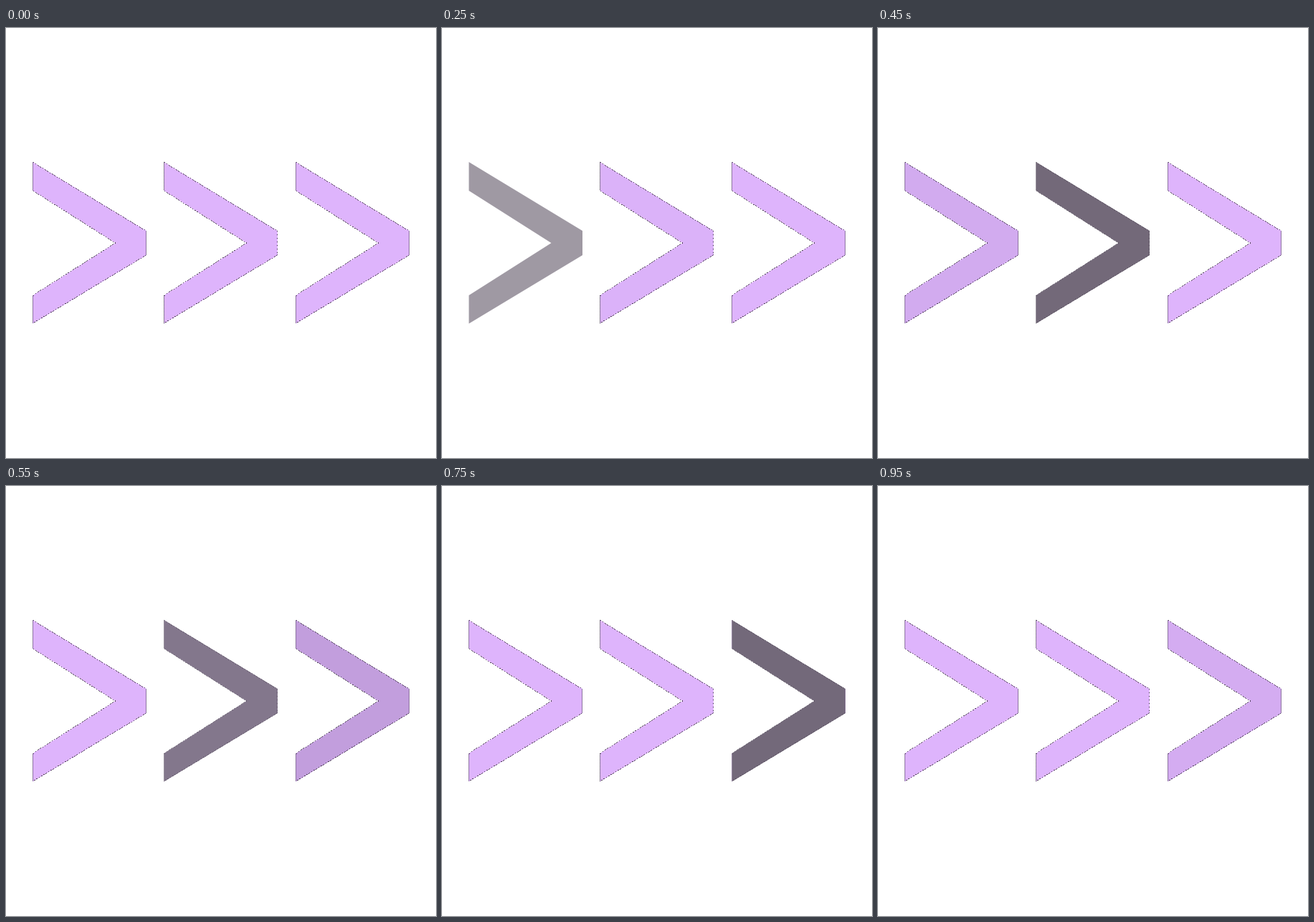
An HTML page for the animation above (1000 ms loop, 600 by 600 pixels).

```html
<!DOCTYPE html>
<html lang="en">
<head>
<meta charset="utf-8">
<title>Chevrons</title>
<style>
  html, body { margin: 0; width: 100%; height: 100%; overflow: hidden; background: #fff; }
  svg { display: block; width: 100vw; height: 100vh; }
  .edge { fill: none; stroke: #2a2230; stroke-width: .8; shape-rendering: crispEdges; }
  .slope { stroke-dasharray: 1.93 1.93; }
  .side { stroke: #8d74a0; stroke-width: 1; }
  .dots .side { stroke: #2a2230; stroke-dasharray: 1 1; }
  .dots .tip { stroke-dasharray: 1 4; }
</style>
</head>
<body>
<svg viewBox="0 0 600 600">
  <defs>
    <path id="body" d="M37.5 187L196 283V317L37.5 412.5V373L152.5 300L37.5 227Z"/>
    <path id="slopes" d="M37.5 187.5L196 283.5M196 316.5L37.5 412M37.5 373L152.5 300L37.5 227"/>
    <path id="back" d="M37.5 187V227M37.5 373V412"/>
    <path id="nose" d="M195.5 283V317"/>
  </defs>
  <g class="chevron">
    <use href="#body"/><use class="edge slope" href="#slopes"/>
    <use class="edge side" href="#back"/><use class="edge side tip" href="#nose"/>
  </g>
  <g class="chevron dots" transform="translate(183 0)">
    <use href="#body"/><use class="edge slope" href="#slopes"/>
    <use class="edge side" href="#back"/><use class="edge side tip" href="#nose"/>
  </g>
  <g class="chevron" transform="translate(367 0)">
    <use href="#body"/><use class="edge slope" href="#slopes"/>
    <use class="edge side" href="#back"/><use class="edge side tip" href="#nose"/>
  </g>
</svg>
<script>
  const LOOP = 1000, STEP = 50;
  const LILAC = [222, 180, 252];
  const DIP = 0.72; // brightness lost at the darkest moment

  // start, darkest moment and end of each dip, in ms
  const DIPS = [[0, 237, 495], [230, 480, 735], [488, 715, 995]];
  const chevrons = [...document.querySelectorAll('.chevron')];

  const ease = x => Math.sin(Math.max(0, Math.min(1, x)) * Math.PI / 2) ** 2;

  function depth(t, [start, peak, end]) {
    return t < peak ? ease((t - start) / (peak - start)) : ease((end - t) / (end - peak));
  }

  // A dim chevron lets the white page through in coarse steps.
  const gaps = level => level < 0.3 ? 0.5 : level < 0.45 ? 0.25 : 0;

  function paint(el, level) {
    const gap = gaps(level);
    const rgb = LILAC.map(c => Math.round(c * level * (1 - gap) + 255 * gap));
    el.setAttribute('fill', `rgb(${rgb})`);
    el.setAttribute('stroke-opacity', 1 - 2 * gap);
  }

  function draw(now) {
    const t = Math.floor(now % LOOP / STEP) * STEP;
    chevrons.forEach((el, i) => paint(el, 1 - DIP * depth(t, DIPS[i])));
    requestAnimationFrame(draw);
  }

  draw(0);
</script>
</body>
</html>
```
